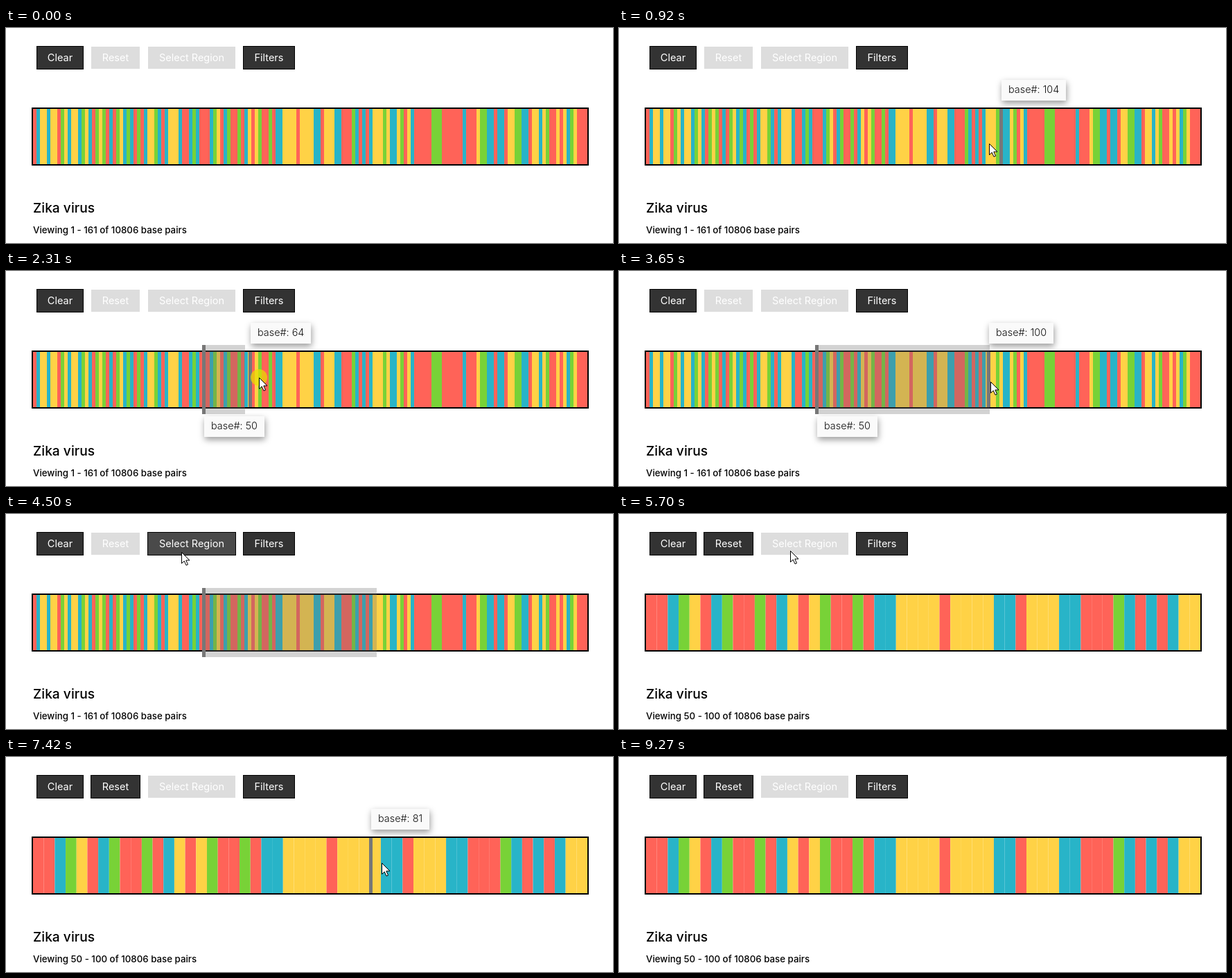
An HTML page with a canvas that plays this animation: 876 px wide and 311 px high, repeating every 10 s.

```html
<!DOCTYPE html>
<html lang="en">
<head>
<meta charset="utf-8">
<title>Genome viewer</title>
<style>
html, body { margin: 0; width: 100%; height: 100%; overflow: hidden; background: #fff; }
canvas { display: block; }
</style>
</head>
<body>
<canvas id="stage" width="876" height="311"></canvas>
<script>
const ctx = document.getElementById('stage').getContext('2d');
const LOOP = 10000, TICK = 66;
const LEFT = 39, TOP = 117, WIDTH = 800, HEIGHT = 80;
const GREY = '#777';
const COLORS = { A: '#ff6358', T: '#ffd246', G: '#28b4c8', C: '#78d237' };

// Start of the genome
const BASES =
  'AGTTGTTACTGTTGCTGACTCAGACTGCGACAGTTCGAGTTTGAAGCGA' +
  'AAGCTAGCAACAGTATCAACAGGTTTTATTTTGGATTTGGAAACGAGAGTT' +
  'TCTGGTCATGAAAAACCCAAAAAAGAAATCCGGAGGATTCCGGATTGTCAATATGCTAAA';

// When things happen, in ms
const ENTER = 330, PRESS = 1980, RELEASE = 3630, SELECTED = 3690,
      HOVER = 4460, CLICK = 5030, ZOOM = 5090, CLICK_END = 5290, LEAVE = 9230;

// Turning points of the pointer: time, x, y
const PATH = [
  [ENTER, 716, 304], [530, 704, 194], [924, 534, 167], [1650, 281, 155],
  [PRESS, 287, 155], [2310, 365, 154], [3080, 536, 160], [3900, 536, 160],
  [4500, 247, 53], [5676, 247, 53], [6400, 41, 152], [7000, 425, 153],
  [7392, 542, 153], [7750, 700, 155], [8460, 855, 157], [LOOP, 855, 157]
];

function pointer(t) {
  const i = Math.max(1, PATH.findIndex(p => p[0] >= t));
  const [t0, x0, y0] = PATH[i - 1], [t1, x1, y1] = PATH[i];
  const k = Math.max(0, (t - t0) / (t1 - t0));
  return { x: x0 + (x1 - x0) * k, y: y0 + (y1 - y0) * k };
}

// The page reacts a little behind the pointer
function mouse(t) {
  const { x, y } = pointer(t - 45);
  return { x: x - 2.2, y };
}

function rect(x, y, w, h, fill) {
  ctx.fillStyle = fill;
  ctx.fillRect(x, y, w, h);
}

function text(str, x, y, size, weight, fill, align = 'left') {
  ctx.font = `${weight} ${size}px Inter, sans-serif`;
  ctx.textAlign = align;
  ctx.fillStyle = fill;
  ctx.fillText(str, x, y);
}

function button(label, x, w, enabled, hovered) {
  if (enabled) {
    rect(x - 1, 26, w + 2, 34, '#000');
    rect(x, 27, w, 32, hovered ? '#4a4a4a' : '#333');
  } else {
    rect(x, 27, w, 32, '#ddd');
  }
  text(label, x + w / 2, 48, 14.5, 400, '#fff', 'center');
}

function tooltip(base, x, y) {
  const label = 'base#: ' + base;
  ctx.font = '300 14.4px Inter, sans-serif';
  const w = Math.round(ctx.measureText(label).width) + 20;
  ctx.save();
  ctx.shadowColor = 'rgba(0,0,0,.4)';
  ctx.shadowBlur = 9;
  ctx.shadowOffsetX = 1;
  ctx.shadowOffsetY = 4;
  rect(x, y, w, 30, '#fafafa');
  ctx.restore();
  text(label, x + 10, y + 19, 14.4, 300, '#111');
}

function sequence(first, count, w) {
  rect(LEFT - 2, TOP - 2, WIDTH + 4, HEIGHT + 4, '#000');
  rect(LEFT, TOP, WIDTH, HEIGHT, '#fff');
  for (let i = 0; i < count; i++)
    rect(LEFT + i * w, TOP, w, HEIGHT, COLORS[BASES[first - 1 + i]]);
}

function selection(t) {
  const start = Math.round(mouse(PRESS + 45).x - 2);
  const end = Math.round(mouse(Math.min(t, RELEASE) - 35).x + 1.2);
  rect(start, 107, Math.max(5, end - start), 100, 'rgba(110,110,110,.3)');
  rect(start, 107, 5, 100, GREY);
  if (t < SELECTED) tooltip(50, start + 3, 210);
}

function hover({ x, y }, first, count) {
  if (x < LEFT || x > LEFT + WIDTH || y < TOP || y > TOP + HEIGHT) return;
  const lineX = Math.round(x - 2.5);
  rect(lineX, TOP, 5, HEIGHT, GREY);
  tooltip(first + Math.floor((x - LEFT) * count / WIDTH), lineX + 3, 75);
}

function arrow(x, y) {
  ctx.save();
  ctx.translate(Math.round(x) + 0.5, Math.round(y) + 0.5);
  ctx.fillStyle = '#fff';
  ctx.strokeStyle = '#000';
  const shape = new Path2D('M0 0V16L3.7 12.5L6.5 18.7L9 17.6L6.3 11.5H11.5Z');
  ctx.fill(shape);
  ctx.stroke(shape);
  ctx.restore();
}

function draw(t) {
  const within = (from, to) => t >= from && t < to;
  const zoomed = t >= ZOOM;
  const [first, last] = zoomed ? [50, 100] : [1, 161];
  const count = last - first + 1;

  rect(0, 0, 876, 311, '#fff');
  button('Clear', 45, 66, true);
  button('Reset', 123, 70, zoomed);
  button('Select Region', 205, 126, within(SELECTED, ZOOM), t >= HOVER);
  button('Filters', 343, 73, true);
  text('Zika virus', 39, 267, 19.2, 500, '#000');
  text(`Viewing ${first} - ${last} of 10806 base pairs`, 39, 297, 13.3, 500, '#000');

  // The wide view draws whole-pixel bars, so the last base falls outside
  if (zoomed) sequence(first, count, WIDTH / count);
  else sequence(first, 160, 5);

  if (within(PRESS, ZOOM)) selection(t);
  if (!within(ENTER, LEAVE)) return;

  hover(mouse(t), first, count);
  const { x, y } = pointer(t);
  if (within(PRESS, RELEASE) || within(CLICK, CLICK_END)) {
    ctx.fillStyle = 'rgba(232,222,0,.72)';
    ctx.beginPath();
    ctx.arc(x, y, 12, 0, Math.PI * 2);
    ctx.fill();
  }
  arrow(x, y);
}

const start = performance.now();
function frame() {
  const t = (performance.now() - start) % LOOP;
  draw(Math.floor((t + 10) / TICK) * TICK);
  requestAnimationFrame(frame);
}
frame();
</script>
</body>
</html>
```
